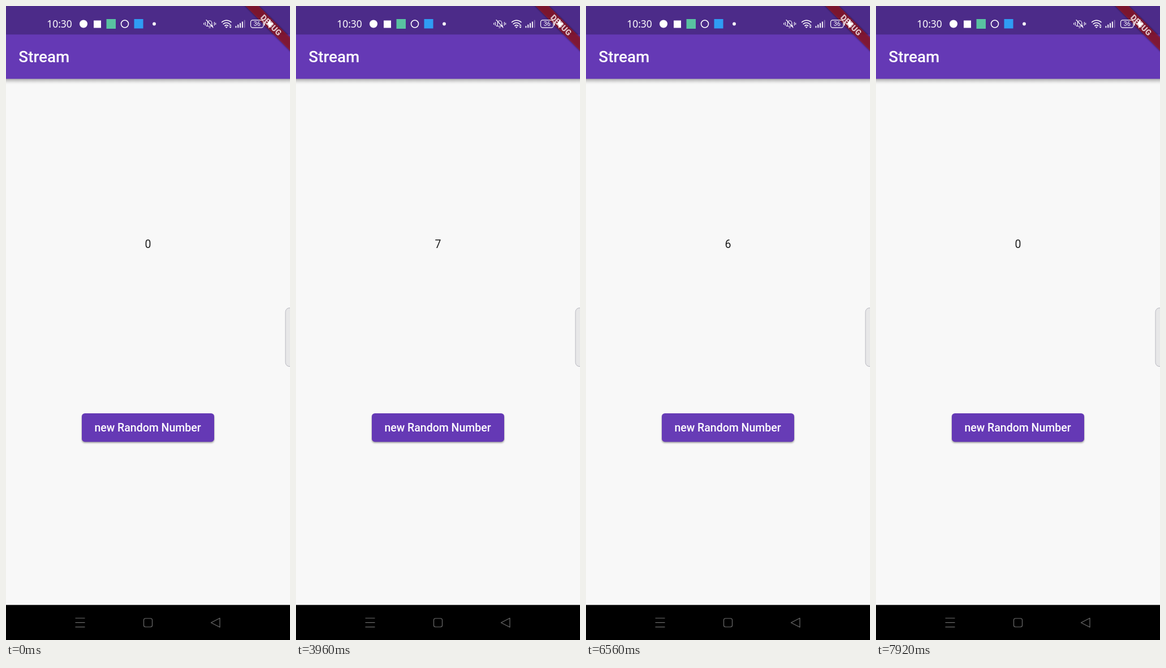
An HTML page that plays this animation: 502 by 1116 pixels, repeating every 8 s.

```html
<!DOCTYPE html>
<html lang="en">
<head>
<meta charset="utf-8">
<title>Random number stream</title>
<style>
  html, body { margin: 0; width: 100%; height: 100%; overflow: hidden; background: #f8f8f8; }
  svg { display: block; width: 502px; height: 1116px; font-family: Roboto, sans-serif; }
  .line { fill: none; stroke: #fff; stroke-width: 1.6; stroke-linecap: round; stroke-linejoin: round; }
  .thin { stroke-width: 1.15; }
  .nav { fill: none; stroke: #6c6c6c; stroke-width: 1.2; stroke-linejoin: round; }
  .mid { text-anchor: middle; }
</style>
</head>
<body>
<svg viewBox="0 0 502 1116">
  <defs>
    <linearGradient id="barShade" x1="0" y1="0" x2="0" y2="1">
      <stop offset="0" stop-opacity=".32"/>
      <stop offset=".35" stop-opacity=".17"/>
      <stop offset=".7" stop-opacity=".05"/>
      <stop offset="1" stop-opacity="0"/>
    </linearGradient>
    <radialGradient id="touchFill">
      <stop offset="0" stop-color="#fff" stop-opacity=".56"/>
      <stop offset=".66" stop-color="#fff" stop-opacity=".6"/>
      <stop offset=".74" stop-color="#fff" stop-opacity=".34"/>
      <stop offset="1" stop-color="#fff" stop-opacity="0"/>
    </radialGradient>
    <filter id="soft" x="-20%" y="-60%" width="140%" height="220%"><feGaussianBlur stdDeviation="1.8"/></filter>
    <filter id="wide" x="-20%" y="-60%" width="140%" height="220%"><feGaussianBlur stdDeviation="5"/></filter>
    <clipPath id="buttonClip"><rect x="134" y="717" width="234" height="50.2" rx="5.5"/></clipPath>
  </defs>

  <rect width="502" height="1116" fill="#f8f8f8"/>
  <rect y="128" width="502" height="10" fill="url(#barShade)"/>
  <rect width="502" height="128.200" fill="#6539b5"/>
  <rect width="502" height="50.200" fill="#4c2b89"/>
  <text x="22.300" y="98.900" font-size="27.900" font-weight="500" fill="#fff">Stream</text>

  <text id="number" class="mid" x="251" y="425.500" font-size="19.500" fill="#1f1f1f">0</text>

  <rect x="494" y="531.500" width="20" height="103" rx="7" fill="#e7e7e8" stroke="#b9b9c0"/>

  <rect id="lowShadow" x="134" y="719" width="234" height="50" rx="5.500" filter="url(#soft)"/>
  <rect id="highShadow" x="134" y="723" width="234" height="52" rx="6" opacity="0" filter="url(#wide)"/>
  <rect x="134" y="717" width="234" height="50.200" rx="5.500" fill="#6539b5"/>
  <g id="ripples" clip-path="url(#buttonClip)" fill="#fff"></g>
  <text class="mid" x="250.500" y="748.900" font-size="19.500" font-weight="500" fill="#fff">new Random Number</text>

  <g transform="translate(502 0) rotate(45)">
    <rect x="-80" y="39" width="160" height="16.700" opacity=".6" filter="url(#soft)"/>
    <rect x="-80" y="39" width="160" height="16.700" fill="#b0182a" fill-opacity=".63"/>
    <text class="mid" x="0" y="52.300" font-size="14.200" font-weight="900" fill="#fff" fill-opacity=".75">DEBUG</text>
  </g>

  <text x="72.300" y="37.700" font-size="17.400" font-family="'Noto Sans', sans-serif" fill="#fff">10:30</text>
  <circle cx="137" cy="31.500" r="7" fill="#fff"/>
  <rect x="155" y="25.500" width="13" height="13" fill="#fff"/>
  <rect x="177.500" y="23" width="16.500" height="17" fill="#59c3a1"/>
  <circle class="line" cx="210" cy="31.500" r="6.500"/>
  <rect x="226.500" y="23" width="16" height="16.500" fill="#2f9df4"/>
  <circle cx="262" cy="31.500" r="2.900" fill="#fff"/>

  <path class="line thin" d="M354.500 35.500h11l-1.700-2.300v-3.400a3.800 3.800 0 0 0-7.600 0v3.400zM358.800 38h2.600M354 24.500l12 13.500"/>
  <path class="line thin" d="M352.300 28.500v5.500M349.700 30v2.500M368.300 28.500v5.500M370.600 30v2.500"/>

  <path class="line" d="M381.500 28.500a12 12 0 0 1 16.500 0M384.200 31.700a8 8 0 0 1 11 0M386.800 34.800a4.500 4.500 0 0 1 5.800 0"/>
  <path d="M387.500 36.500h4.400l-2.200 2.600zM394.400 34.800l2.200-2.600 2.200 2.600zM394.400 36.300l2.200 2.600 2.200-2.600z" fill="#fff"/>

  <g id="signal" fill="#fff"></g>

  <rect class="line thin" x="432.500" y="24.800" width="22.500" height="13.400" rx="3.600"/>
  <path class="line" d="M456.800 29.300v4.400"/>
  <text class="mid" x="443.700" y="35.400" font-size="10.800" fill="#fff">36</text>
  <path d="M467.500 23.500l-7.500 9h4.800l-1 7 8.800-9.600h-5.200z" fill="#fff"/>

  <rect y="1054.300" width="502" height="61.700"/>
  <path class="nav" d="M122.500 1077.500h17M122.500 1085.300h17M122.500 1093.200h17"/>
  <rect class="nav" x="243.500" y="1078" width="15" height="15" rx="3"/>
  <path class="nav" d="M362.500 1085.500l15.500-8v16z"/>

  <circle id="touch" cx="283" cy="738" r="21" fill="url(#touchFill)" opacity="0"/>
</svg>

<script>
  const LOOP = 8000;
  const SVG = 'http://www.w3.org/2000/svg';
  const TOUCH = { x: 283, y: 738 };
  const CENTER = { x: 251, y: 742.2 };
  const REACH = 127;

  // Each press: finger down, finger up, number shown afterwards.
  const taps = [
    { down: 2600, up: 2645, value: 7 },
    { down: 4790, up: 4925, value: 6 },
    { down: 5430, up: 5565, value: 6 },
    { down: 6060, up: 6195, value: 6 },
    { down: 6680, up: 6814, value: 0 },
    { down: 7300, up: 7540, value: 0 }
  ];

  const byId = id => document.getElementById(id);
  const clamp = v => Math.min(1, Math.max(0, v));
  const mix = (a, b, k) => a + (b - a) * k;
  const ease = k => 1 - Math.pow(1 - k, 2.4);
  const pressStart = tap => Math.min(tap.down + 50, tap.up);

  function set(node, attrs) {
    for (const key in attrs) node.setAttribute(key, attrs[key]);
  }

  function add(parent, tag, attrs) {
    const node = document.createElementNS(SVG, tag);
    set(node, attrs);
    parent.appendChild(node);
    return node;
  }

  for (let i = 0; i < 5; i++) {
    const height = 3.5 + i * 2.6;
    add(byId('signal'), 'rect', {
      x: 405.5 + i * 3.8, y: 38.5 - height, width: 1.9, height, rx: 0.9, opacity: i < 4 ? 1 : 0.3
    });
  }

  const number = byId('number');
  const touch = byId('touch');
  const lowShadow = byId('lowShadow');
  const highShadow = byId('highShadow');
  const ripples = taps.map(() => add(byId('ripples'), 'circle', { r: 0 }));

  // The ripple creeps while held, then rushes outward and fades on release.
  function rippleAt(tap, t) {
    const start = pressStart(tap);
    const held = clamp((Math.min(t, tap.up) - start) / 1000);
    const spread = ease(clamp(held + Math.max(0, t - tap.up) / 225));
    const fadeIn = clamp((t - start) / 75);
    const fadeOut = 1 - clamp((t - tap.up - 225) / 150);
    return {
      cx: mix(TOUCH.x, CENTER.x, spread),
      cy: mix(TOUCH.y, CENTER.y, spread),
      r: mix(REACH * 0.3, REACH, spread),
      opacity: 0.24 * fadeIn * fadeOut
    };
  }

  function liftAt(tap, t) {
    const rise = clamp((Math.min(t, tap.up) - pressStart(tap)) / 200);
    return rise * (1 - clamp((t - tap.up) / 200));
  }

  function draw(t) {
    let value = 0, pressed = false, lift = 0;
    taps.forEach((tap, i) => {
      if (t >= tap.up) value = tap.value;
      if (t >= tap.down && t < tap.up) pressed = true;
      lift = Math.max(lift, liftAt(tap, t));
      set(ripples[i], rippleAt(tap, t));
    });
    if (number.textContent !== String(value)) number.textContent = value;
    set(touch, { opacity: pressed ? 1 : 0 });
    set(lowShadow, { opacity: mix(0.36, 0.24, lift) });
    set(highShadow, { opacity: 0.38 * lift });
  }

  const begin = performance.now();
  function tick() {
    draw((performance.now() - begin) % LOOP);
    requestAnimationFrame(tick);
  }
  tick();
</script>
</body>
</html>
```
